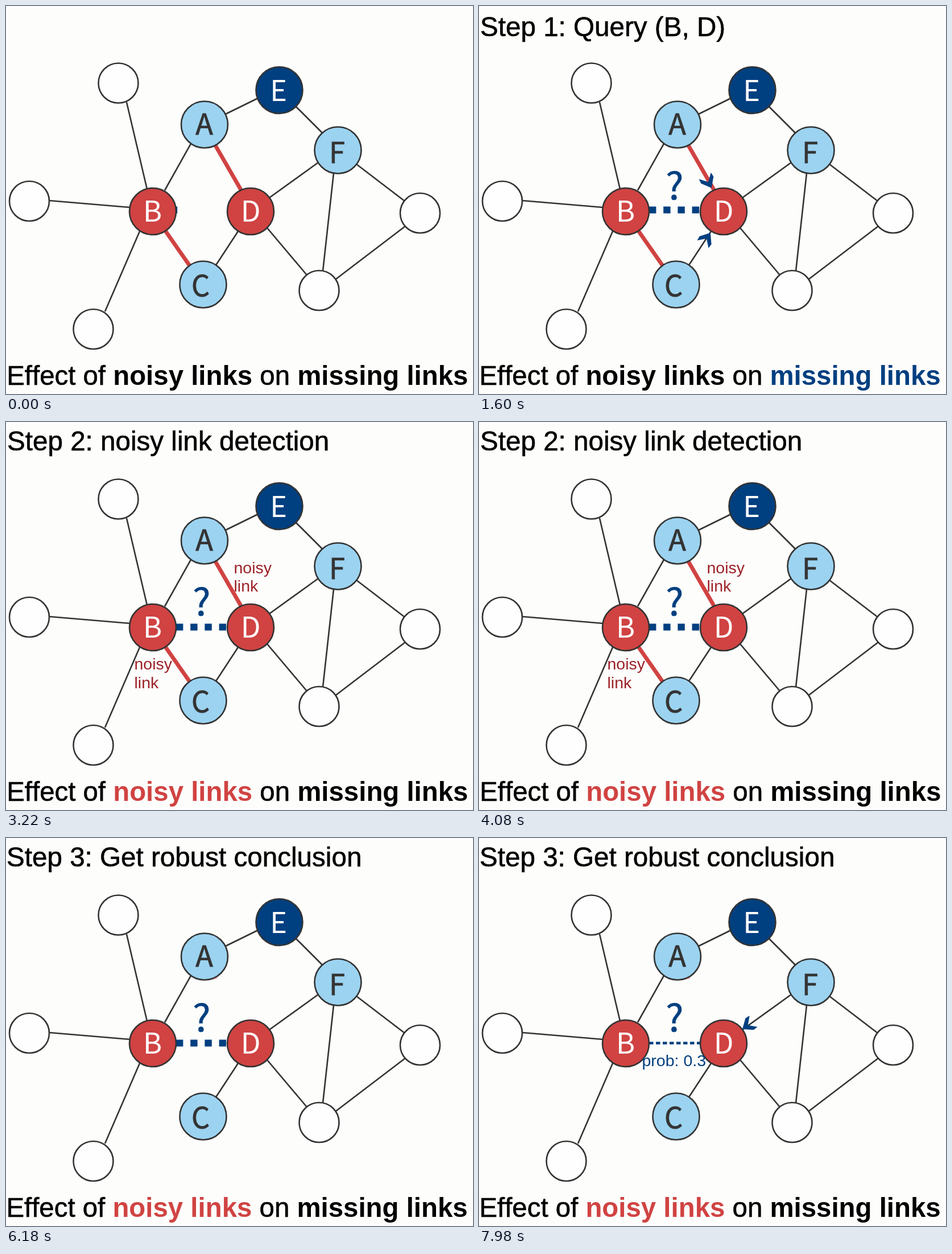
These frames come from a looping animation (821 by 682 pixels, 8000 ms). An HTML page:

```html
<!DOCTYPE html>
<html lang="en">
<head>
<meta charset="utf-8">
<title>Noisy links and missing links</title>
<style>
  html, body { margin: 0; width: 100%; height: 100%; overflow: hidden; background: #fdfdfb; }
  svg { display: block; width: 100%; height: 100%; }
  text { font-family: "Liberation Sans", Arial, sans-serif; font-kerning: none; white-space: pre; }
  .title { font-size: 47.6px; stroke: #000; stroke-width: 0.6px; }
  .caption { font-size: 47.4px; stroke: #000; stroke-width: 0.6px; }
  .caption tspan { font-weight: 700; stroke: none; }
  .small { font-size: 28.5px; }
  .letter, .ask { font-family: "Noto Sans CJK JP", "Noto Sans CJK SC", "Noto Sans", sans-serif; text-anchor: middle; }
  .letter { font-size: 50.5px; }
  .ask { font-size: 66px; fill: #003f80; stroke: #003f80; stroke-width: 0.7px; }
</style>
</head>
<body>
<svg id="stage" viewBox="0 0 821 682"></svg>
<script>
const LOOP = 8000;
const NAVY = '#003f80', SKY = '#9cd3f0', RED = '#d04342', WINE = '#9c2228', INK = '#333';
const stage = document.getElementById('stage');

function add(tag, attrs, parent = stage, text = '') {
  const el = document.createElementNS('http://www.w3.org/2000/svg', tag);
  for (const key in attrs) el.setAttribute(key, attrs[key]);
  el.textContent = text;
  parent.appendChild(el);
  return el;
}

function line([x1, y1, x2, y2], stroke, width, parent) {
  return add('line', { x1, y1, x2, y2, stroke, 'stroke-width': width }, parent);
}

const clamp = v => Math.max(0, Math.min(1, v));
const span = (t, a, b) => clamp((t - a) / (b - a));
const ease = p => p * p * (3 - 2 * p);
const show = (el, on) => el.setAttribute('visibility', on ? 'visible' : 'hidden');

add('rect', { width: 821, height: 682, fill: '#fdfdfb' });

// Links
[
  [212, 169, 248, 322], [76, 342, 218, 354], [235, 396, 174, 537],
  [325, 242, 279, 324], [386, 190, 443, 162], [510, 177, 556, 223],
  [463, 337, 549, 275], [616, 278, 701, 343], [702, 387, 580, 480],
  [576, 294, 557, 466], [459, 390, 529, 473], [368, 457, 408, 396]
].forEach(p => line(p, INK, 2.6));

const noisy = add('g', {});
line([368, 245, 413, 323], RED, 7, noisy);
line([280, 395, 324, 458], RED, 7, noisy);

const dots = line([299, 358.5, 388, 358.5], NAVY, 12);

// Nodes
[[197.5, 135.5], [41, 343], [153.5, 568], [728, 364], [550.5, 500]].forEach(([cx, cy]) =>
  add('circle', { cx, cy, r: 35, fill: '#fefefe', stroke: INK, 'stroke-width': 2.6 }));

[
  ['A', 349, 208.5, SKY, 348.5, 226],
  ['B', 258, 361, RED, 257.5, 378.5],
  ['C', 346.5, 489.5, SKY, 342, 509.5],
  ['D', 430, 361, RED, 430, 378.5],
  ['E', 480.5, 148, NAVY, 479, 166.5],
  ['F', 583.5, 253.5, SKY, 582, 275.5]
].forEach(([name, cx, cy, fill, x, y]) => {
  add('circle', { cx, cy, r: 41, fill, stroke: INK, 'stroke-width': 2.6 });
  const color = fill === SKY ? INK : '#fff';
  add('text', { class: 'letter', x, y, fill: color, stroke: color, 'stroke-width': fill === SKY ? 0.8 : 0 }, stage, name);
});

const trace = line([364, 247.5, 371, 246], RED, 1.5);

// Arrowheads: tip path and the part of it that is travelled
const arrow = (path, from, to) => ({
  path, from, to,
  el: add('path', { d: 'M0 0L-15.5-12.5L-24-12L-12 0L-24 12L-15.5 12.5Z', fill: NAVY })
});
const fromA = arrow([368, 245, 410, 322], 0.37, 0.97);
const fromC = arrow([368, 457, 408, 397], 0.46, 0.97);
const fromF = arrow([548, 276, 463, 336], 0.28, 1);

function place(a, p, on) {
  const [x1, y1, x2, y2] = a.path;
  const k = a.from + (a.to - a.from) * p;
  const angle = Math.atan2(y2 - y1, x2 - x1) * 180 / Math.PI;
  a.el.setAttribute('transform', `translate(${x1 + (x2 - x1) * k} ${y1 + (y2 - y1) * k}) rotate(${angle})`);
  show(a.el, on);
}

// Texts
const ask = add('text', { class: 'ask', x: 344, y: 340 }, stage, '?');
const prob = add('text', { class: 'small', x: 286.5, y: 401, fill: NAVY }, stage, 'prob: 0.3');
const labels = add('g', { class: 'small', fill: WINE });
[[400.5, 265.5], [225.5, 435]].forEach(([x, y]) => {
  add('text', { x, y }, labels, 'noisy');
  add('text', { x, y: y + 32.5 }, labels, 'link');
});

const title = add('text', { class: 'title' });
const caption = add('text', { class: 'caption', y: 666.4 });
caption.append('Effect of ');
const noisyWord = add('tspan', {}, caption, 'noisy links');
caption.append(' on ');
const missingWord = add('tspan', {}, caption, 'missing links');

const steps = [
  { at: 0, title: '', x: 2, y: 53.3, shift: 1.2 },
  { at: 200, title: 'Step 1: Query (B, D)', x: 2, y: 53.3, shift: 0.4, missing: NAVY },
  { at: 2600, title: 'Step 2: noisy link detection', x: 2, y: 50.2, shift: 1.2, noisy: RED },
  { at: 5250, title: 'Step 3: Get robust conclusion', x: 1, y: 50.2, shift: 0.4, noisy: RED }
];

function draw(t) {
  const step = steps.filter(s => t >= s.at).pop();
  title.textContent = step.title;
  title.setAttribute('x', step.x);
  title.setAttribute('y', step.y);
  caption.setAttribute('x', step.shift);
  noisyWord.setAttribute('fill', step.noisy || '#000');
  missingWord.setAttribute('fill', step.missing || '#000');

  // Query link: wipes in, later gets thin
  const thin = t >= 7300;
  const y = t < 2600 ? 358.5 : 360.5;
  dots.setAttribute('x2', 301 + 87 * span(t, 0, 500));
  dots.setAttribute('y1', y);
  dots.setAttribute('y2', y);
  dots.setAttribute('stroke-width', thin ? 4.5 : 12);
  dots.setAttribute('stroke-dasharray', thin ? '7.5 4.5' : '12.4 12.8');

  show(ask, t >= 450);
  show(prob, thin);
  show(labels, t >= 2800 && t < 5250);
  noisy.setAttribute('opacity', 1 - span(t, 5250, 5600));
  trace.setAttribute('opacity', 0.6 * span(t, 5250, 5600));

  const first = ease(span(t, 900, 1600));
  const firstOn = t >= 900 && t < 2450;
  place(fromA, first, firstOn);
  place(fromC, first, firstOn);
  place(fromF, ease(span(t, 6500, 7200)), t >= 6500);
}

const start = performance.now();
function tick() {
  draw((performance.now() - start) % LOOP);
  requestAnimationFrame(tick);
}
tick();
</script>
</body>
</html>
```
